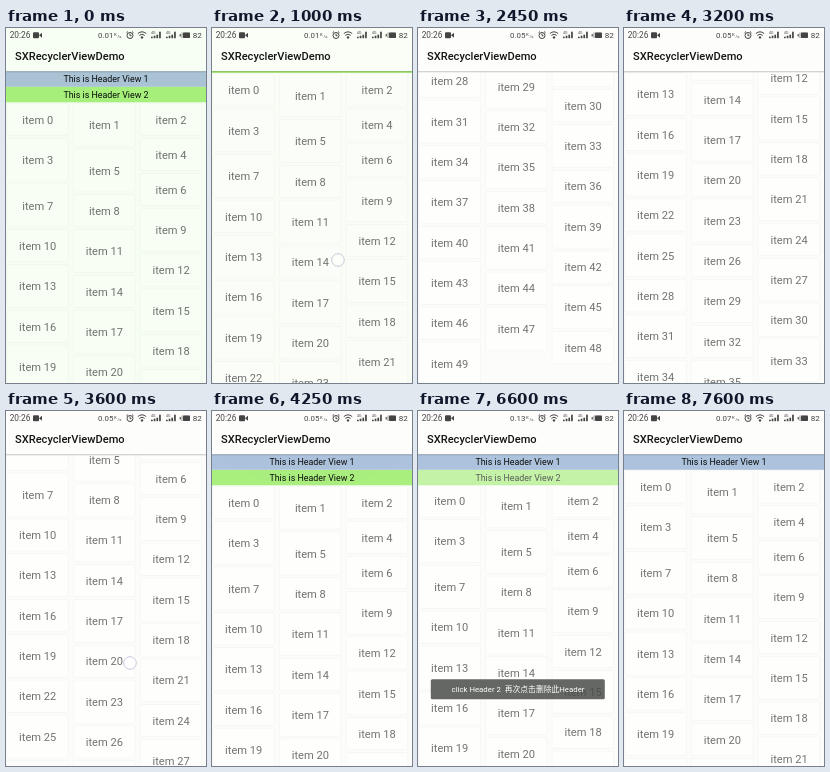
Recreate the animation shown at these times as an HTML page. Size 200x355 px, loop 8000 ms.

```html
<!DOCTYPE html>
<html lang="en">
<head>
<meta charset="utf-8">
<title>Staggered list</title>
<style>
  html, body { margin: 0; width: 100%; height: 100%; overflow: hidden; background: #fcfdfb; }
  svg { display: block; width: 100vw; height: 100vh; font-family: Roboto, "Noto Sans CJK SC", "Noto Sans CJK", sans-serif; }
  text { white-space: pre; }
  .mid { text-anchor: middle; }
  .item { font-size: 11.1px; fill: #727272; }
  .head { font-size: 8.9px; fill: #0a0c0a; }
  .card { fill: #fefefd; stroke: #f4f5f3; stroke-width: .7; }
  .status { fill: #444; font-size: 8.3px; }
  #tint { mix-blend-mode: multiply; }
</style>
</head>
<body>
<svg viewBox="0 0 200 355" preserveAspectRatio="none">
  <defs>
    <linearGradient id="shade" x2="0" y2="1">
      <stop stop-color="#000" stop-opacity=".22"/>
      <stop offset="1" stop-color="#000" stop-opacity="0"/>
    </linearGradient>
  </defs>
  <rect width="200" height="355" fill="#fcfdfb"/>

  <g id="list">
    <g id="cards"></g>
    <g id="header2">
      <rect y="58.8" width="200" height="15.5" fill="#a9ef7e"/>
      <text class="head mid" x="100" y="69.6">This is Header View 2</text>
    </g>
    <rect y="43.3" width="200" height="15.5" fill="#adc3dd"/>
    <text class="head mid" x="100" y="54.2">This is Header View 1</text>
  </g>

  <path id="glow" d="M0 43H200Q100 108 0 43Z" fill="#888" opacity="0"/>
  <rect y="43" width="200" height="2" fill="url(#shade)"/>
  <rect width="200" height="43" fill="#fdfefc"/>
  <text x="9" y="32" font-size="11.1" font-weight="500" fill="#151515">SXRecyclerViewDemo</text>

  <g class="status" transform="translate(0 -.8)">
    <text x="3.7" y="11">20:26</text>
    <rect x="27" y="5" width="6" height="6" rx="1"/>
    <path d="M33 8L36 5.5V10.5Z"/>
    <text id="speed" x="92" y="11" font-size="7.9"></text>
    <text x="108" y="8.4" font-size="4.4">K</text>
    <text x="111.4" y="10.8" font-size="4.4">/s</text>
    <g fill="none" stroke="#444" stroke-width="1">
      <circle cx="124" cy="8.3" r="3"/>
      <path d="M124 6.5V8.5H125.5M120.5 5.6L122 4.3M127.5 5.6L126 4.3"/>
      <path d="M131.8 6.4Q136 2.8 140.2 6.4M133.3 8.2Q136 5.8 138.7 8.2"/>
    </g>
    <circle cx="136" cy="10.2" r="1.2"/>
    <g id="bars"></g>
    <rect x="174.8" y="5.4" width="9" height="5.4" rx=".8" opacity=".3"/>
    <rect x="177" y="5.4" width="7" height="5.4" rx=".8"/>
    <rect x="173.6" y="7" width="1.2" height="2.2"/>
    <text x="186.8" y="11" font-size="8.1">82</text>
  </g>

  <g id="toast" opacity="0">
    <rect x="12.8" y="268.3" width="174" height="20" rx="1.5" fill="#484a48" fill-opacity=".84"/>
    <text class="mid" x="100" y="281.4" font-size="7.8" fill="#fff">click Header 2  再次点击删除此Header</text>
  </g>
  <circle id="touch" r="6.3" fill="#fff" fill-opacity=".75" stroke="#c9c9dc" stroke-width="1"/>
  <rect id="tint" width="200" height="355" fill="#f9fff6"/>
</svg>

<script>
const LOOP = 8000, STEP = 50;
const $ = id => document.getElementById(id);

function add(parent, tag, attrs, text) {
  const el = document.createElementNS("http://www.w3.org/2000/svg", tag);
  for (const k in attrs) el.setAttribute(k, attrs[k]);
  if (text) el.textContent = text;
  parent.append(el);
}

// Each item goes to the shortest column; odd items are taller.
const bottoms = [74, 74, 74];

function shortest() {
  let best = 0;
  for (let c = 1; c < 3; c++) if (bottoms[c] < bottoms[best] - .1) best = c;
  return best;
}

for (let i = 0; i < 50; i++) {
  const h = i % 2 ? 45.67 : 35;
  const col = shortest(), x = col * 66.67, y = bottoms[col];
  add($("cards"), "rect", { class: "card", x: x + .8, y: y + 1.2, width: 61.6, height: h - 2.6, rx: 1 });
  add($("cards"), "text", { class: "item mid", x: x + 31.7, y: y + h / 2 + 4.1 }, "item " + i);
  bottoms[col] += h;
}

for (const x of [145, 160]) {
  add($("bars"), "text", { x, y: 7, "font-size": 3.6 }, "4G");
  for (let i = 0; i < 4; i++) {
    const h = i < 3 ? 1.5 + i : 6.5;
    add($("bars"), "rect", { x: x + i * 2.7, y: 11 - h, width: 1.7, height: h });
  }
}

const linear = p => p;
const out = p => 1 - (1 - p) ** 2;
const inOut = p => (1 - Math.cos(Math.PI * p)) / 2;

// Rows: time, value, easing of the segment that ends there
function track(rows, t) {
  if (t <= rows[0][0]) return rows[0][1];
  for (let i = 1; i < rows.length; i++) {
    const [t0, v0] = rows[i - 1], [t1, v1, ease = linear] = rows[i];
    if (t < t1) return v0 + (v1 - v0) * ease((t - t0) / (t1 - t0));
  }
  return rows[rows.length - 1][1];
}

const scroll = [
  [650, 0], [1000, 29.4], [1150, 55], [1650, 85, out],
  [1900, 117.5], [2050, 175], [2450, 406.5, out], [2500, 410.5],
  [2750, 410.5], [2950, 330], [3450, 146, out],
  [3600, 93.8], [3700, 40], [3950, 0, out]
];
const shift = [[6550, 0], [6800, 15.5, inOut]];
const header2 = [[6550, 1], [6700, 0]];
const toast = [[5250, 0], [5400, .48], [5600, 1, out], [7300, 1], [7600, 0]];
const glow = [[3900, 0], [3950, .12], [4300, 0]];
const tint = [[600, 1], [1400, 0]];

// Touches: start, end, x, and y over time
const touches = [
  [600, 1150, 126, [[650, 261], [1000, 232], [1150, 206]]],
  [1650, 2050, 135, [[1650, 237.5], [1900, 205], [2050, 147.5]]],
  [2700, 2950, 122, [[2750, 150], [2950, 230.5]]],
  [3450, 3700, 124, [[3450, 200], [3600, 252], [3700, 306]]],
  [5100, 5250, 128, [[5100, 64]]],
  [6100, 6300, 128, [[6100, 64]]]
];

const speedAt = t => t < 1500 ? "0.01" : t < 4500 ? "0.05" : t < 7500 ? "0.13" : "0.07";

function draw(t) {
  $("list").setAttribute("transform", `translate(0 ${-track(scroll, t)})`);
  $("cards").setAttribute("transform", `translate(0 ${-track(shift, t)})`);
  $("header2").setAttribute("opacity", track(header2, t));
  $("toast").setAttribute("opacity", track(toast, t));
  $("glow").setAttribute("opacity", track(glow, t));
  $("tint").setAttribute("opacity", track(tint, t));
  $("speed").textContent = speedAt(t);
  const touch = touches.find(([from, to]) => t >= from && t < to);
  $("touch").setAttribute("visibility", touch ? "visible" : "hidden");
  if (touch) {
    $("touch").setAttribute("cx", touch[2]);
    $("touch").setAttribute("cy", track(touch[3], t));
  }
}

const start = performance.now();
function tick() {
  const t = (performance.now() - start) % LOOP;
  draw(Math.floor(t / STEP) * STEP);
  requestAnimationFrame(tick);
}
tick();
</script>
</body>
</html>
```
